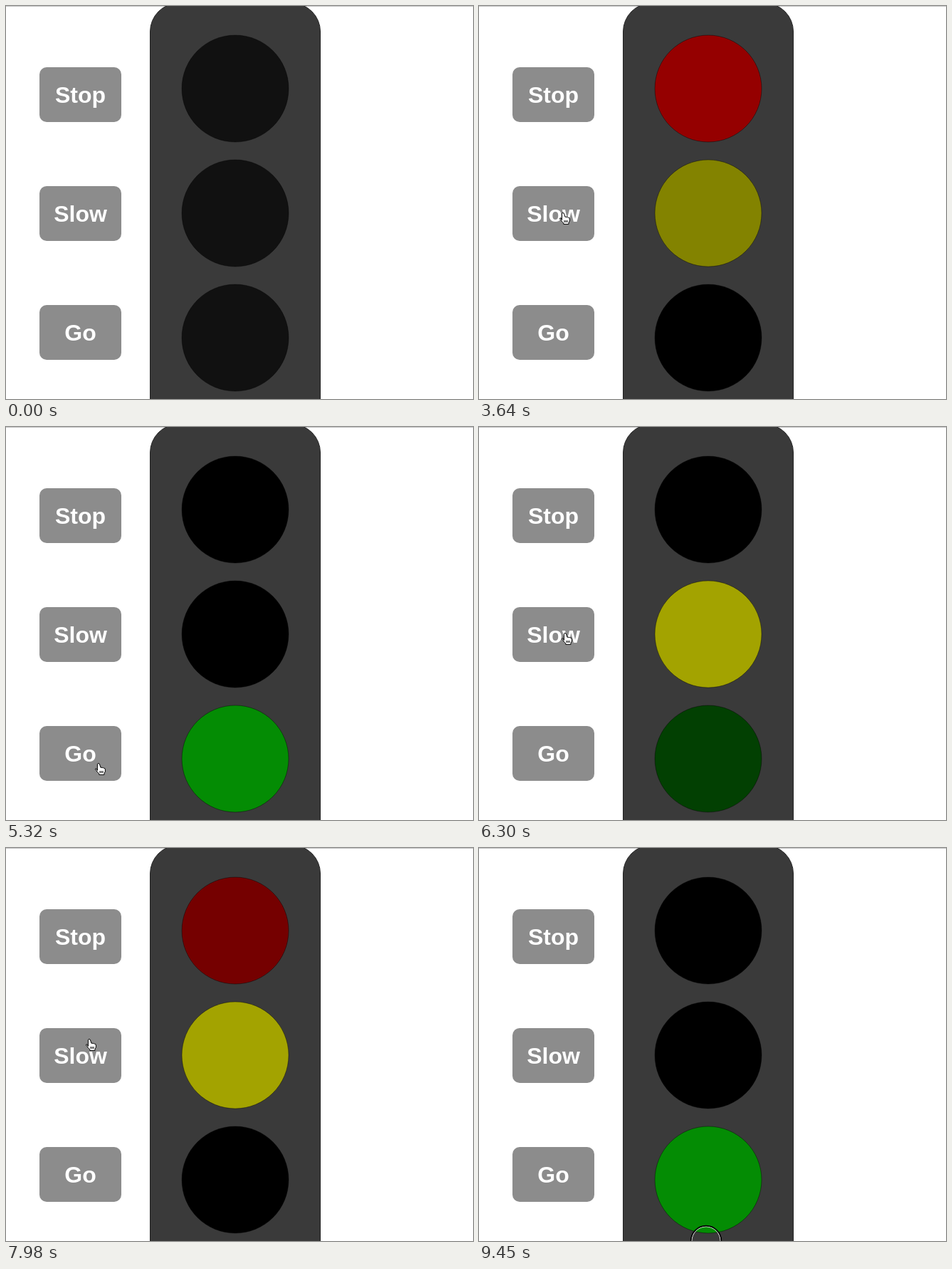
An HTML page that plays this animation: 656 by 552 pixels, repeating every 9520 ms.

```html
<!DOCTYPE html>
<html lang="en">
<head>
<meta charset="utf-8">
<title>Traffic light</title>
<style>
  html, body { margin: 0; width: 100%; height: 100%; overflow: hidden; background: #fff; }
  svg { display: block; width: 656px; height: 552px; }
  text { font: bold 32px "Liberation Sans", Arial, sans-serif; fill: #fff; text-anchor: middle; }
  .button { fill: #8c8c8c; }
  .lamp { stroke: #000; stroke-opacity: .4; }
  .cursor { fill: #fff; stroke: #000; stroke-linejoin: round; }
  #ring { fill: none; }
</style>
</head>
<body>
<svg viewBox="0 0 656 552">
  <path d="M0 .5H656" stroke="#c4c4c4"/>
  <rect x="202.5" y="-4" width="239" height="620" rx="40" fill="#3a3a3a" stroke="#222"/>
  <g id="lamps"></g>
  <g id="buttons"></g>
  <g id="pointer">
    <path id="hand" class="cursor" d="M-2.6 10.5V1.8Q-2.4.4-1 .5Q.2.6.6 2L2 6.4Q3 5.4 4.2 6.7Q5.4 5.8 6.4 7.2Q8.3 6.8 8.4 9V12L7 14.2V16.4H-.2V15Q-2.6 13-4.1 10.7L-5.4 9Q-5.6 7.5-4.2 7.7ZM1 11v3M3 11v3M5 11v3"/>
    <path id="arrow" class="cursor" d="M0 .5V14L3 11.2L5.2 16.3L7.6 15.2L5.4 10.3H9.6Z"/>
  </g>
  <g id="ring">
    <circle stroke="#fff"/>
    <circle stroke="#000" stroke-width="1.6"/>
  </g>
</svg>
<script>
const LOOP = 9520, STEP = 70;
const FADE_DELAY = 40, FADE = 500, GAMMA = 0.865;
const TRAVEL_FROM = 0.4, TRAVEL_TO = 0.85;
const OFF = [17, 17, 17], BLACK = [0, 0, 0];
const LIT = [[255, 0, 0], [255, 255, 0], [4, 140, 4]];
const STOP = 0, SLOW = 1, GO = 2;

// The pointer enters at the first point and presses at all the others.
const presses = [
  { time: 0, x: 191, y: 370 },
  { time: 1000, x: 85, y: 134 },
  { time: 1770, x: 99, y: 97, lamp: STOP },
  { time: 3462, x: 119, y: 290, lamp: SLOW },
  { time: 4752, x: 131, y: 474, lamp: GO },
  { time: 6088, x: 122, y: 289, lamp: SLOW },
  { time: 6858, x: 107, y: 124, lamp: STOP },
  { time: 7768, x: 118, y: 268, lamp: SLOW },
  { time: 8608, x: 121, y: 465, lamp: GO },
  { time: 9385, x: 319, y: 552 }
];
const switches = presses.filter(press => press.lamp !== undefined);

const $ = id => document.getElementById(id);
const clamp = v => Math.max(0, Math.min(1, v));
const lerp = (a, b, p) => a + (b - a) * p;
const smooth = p => p * p * (3 - 2 * p);
const buttonTop = i => 86 + 167 * i;

$("lamps").innerHTML = LIT.map((_, i) =>
  `<circle class="lamp" cx="322" cy="${116 + 175 * i}" r="75"/>`).join("");
$("buttons").innerHTML = ["Stop", "Slow", "Go"].map((label, i) =>
  `<rect class="button" x="47" y="${buttonTop(i)}" width="115" height="77" rx="10"/>
   <text x="104.5" y="${buttonTop(i) + 50}">${label}</text>`).join("");
const lamps = [...$("lamps").children];

// cubic-bezier(.25, .1, .25, 1)
function ease(p) {
  if (p <= 0 || p >= 1) return clamp(p);
  const bezier = (a, b, s) => 3 * a * s * (1 - s) ** 2 + 3 * b * s * s * (1 - s) + s ** 3;
  let low = 0, high = 1;
  for (let i = 0; i < 24; i++) {
    const mid = (low + high) / 2;
    if (bezier(0.25, 0.25, mid) < p) low = mid; else high = mid;
  }
  return bezier(0.1, 1, low);
}

const mix = (from, to, p) => from.map((v, k) =>
  lerp(v ** (1 / GAMMA), to[k] ** (1 / GAMMA), p) ** GAMMA);

const lampColor = (lamp, t) => switches.reduce((color, press) =>
  mix(color, press.lamp === lamp ? LIT[lamp] : BLACK,
    ease((t - press.time - FADE_DELAY) / FADE)), OFF);

// Rest after a press, travel, then settle before the next press.
function pointerAt(t, last) {
  const from = presses[last], to = presses[last + 1] || from;
  const progress = (t - from.time) / (to.time - from.time || 1);
  const p = smooth(clamp((progress - TRAVEL_FROM) / (TRAVEL_TO - TRAVEL_FROM)));
  return [lerp(from.x, to.x, p), lerp(from.y, to.y, p)].map(Math.round);
}

const show = (id, visible) => $(id).setAttribute("visibility", visible ? "visible" : "hidden");

function draw(t) {
  lamps.forEach((lamp, i) =>
    lamp.setAttribute("fill", `rgb(${lampColor(i, t).map(Math.round)})`));

  const last = presses.filter(press => press.time <= t).length - 1;
  const age = t - presses[last].time;
  const [x, y] = pointerAt(t, last);
  const entered = last > 0 || t >= TRAVEL_FROM * presses[1].time;
  const overButton = x >= 47 && x <= 162 &&
    [STOP, SLOW, GO].some(i => y >= buttonTop(i) && y <= buttonTop(i) + 77);
  show("hand", entered && overButton);
  show("arrow", entered && !overButton);
  show("ring", last > 0 && age < STEP);

  for (const id of ["pointer", "ring"]) $(id).setAttribute("transform", `translate(${x} ${y})`);
  const radius = Math.max(0, 33 - age / 6);
  [...$("ring").children].forEach((circle, i) =>
    circle.setAttribute("r", Math.max(0, radius - (i ? 0.8 : 2))));
}

const begin = performance.now();
function tick() {
  const t = (performance.now() - begin) % LOOP;
  draw(Math.floor(t / STEP) * STEP);
  requestAnimationFrame(tick);
}
tick();
</script>
</body>
</html>
```
